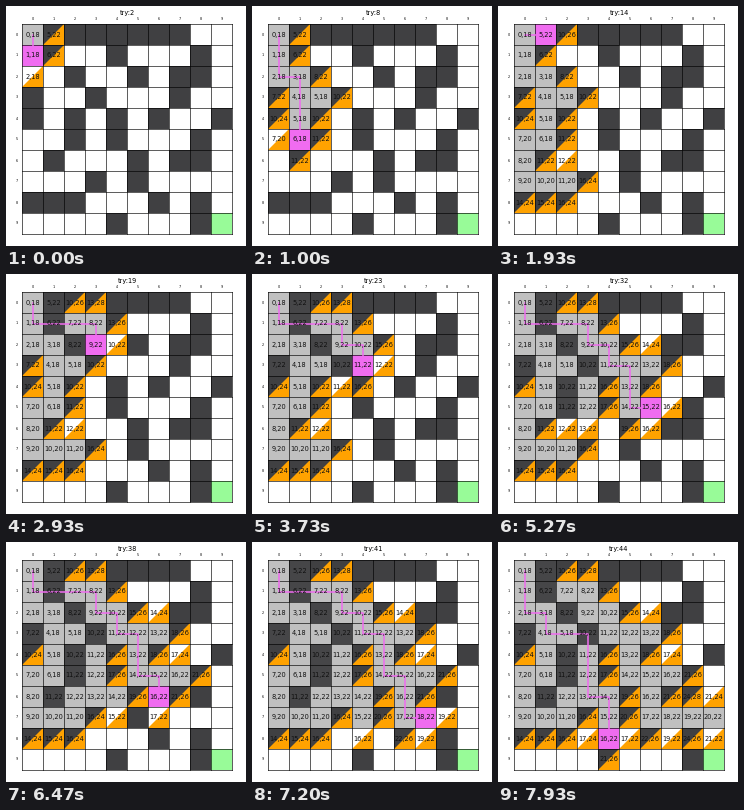
These frames come from a looping animation (240x240 px, 8000 ms). A matplotlib script:

```python
import matplotlib.pyplot as plt
from matplotlib.animation import FuncAnimation
from matplotlib.patches import Polygon, Rectangle

SIZE, DPI = 240, 100
FRAMES, LOOP_MS = 120, 8000
N, CELL, X0, Y0 = 10, 21, 16, 18
WALL_COST = 5

MAZE = [
    ".#######..",
    ".#..#...#.",
    "..#..#.##.",
    "#..#...#..",
    "#.#.#.#..#",
    "..#.#...#.",
    ".#...#.##.",
    "...#.#....",
    "###...#.#.",
    "....#...#.",
]

WHITE, WALL, CLOSED = "#ffffff", "#404042", "#c0c0c0"
CLOSED_WALL, ORANGE = "#464648", "#ffa200"
CURRENT, GOAL = "#f06cf0", "#98fb98"


def is_wall(cell):
    return MAZE[cell[0]][cell[1]] == "#"


def h(cell):
    return 2 * (N - 1) - cell[0] - cell[1]


def search(tries):
    """A* over the maze; returns one snapshot per expanded cell."""
    cost, parent = {(0, 0): 0}, {}
    opened, closed, steps = {(0, 0)}, set(), []
    for _ in range(tries):
        cur = min(opened, key=lambda c: (cost[c] + h(c), c))
        opened.remove(cur)
        closed.add(cur)
        r, c = cur
        for nxt in ((r - 1, c), (r, c - 1), (r, c + 1), (r + 1, c)):
            if not (0 <= nxt[0] < N and 0 <= nxt[1] < N) or nxt in closed:
                continue
            g = cost[cur] + (WALL_COST if is_wall(nxt) else 1)
            if g < cost.get(nxt, 999):
                cost[nxt], parent[nxt] = g, cur
                opened.add(nxt)
        path = [cur]
        while path[-1] in parent:
            path.append(parent[path[-1]])
        steps.append((cur, dict(cost), set(opened), set(closed), path))
    return steps


STEPS = search(44)


def try_at(frame):
    # the search slows down a little as the board fills
    return min(44, int(2.99 + 0.407 * frame - 0.00047 * frame ** 2))


def corner(cell):
    return X0 + CELL * cell[1], Y0 + CELL * cell[0]


def center(cell):
    x, y = corner(cell)
    return x + CELL / 2, y + CELL / 2


fig = plt.figure(figsize=(SIZE / DPI, SIZE / DPI), dpi=DPI, facecolor="white")
ax = fig.add_axes([0, 0, 1, 1])
ax.set_xlim(0, SIZE)
ax.set_ylim(SIZE, 0)
ax.axis("off")

CELLS = [(r, c) for r in range(N) for c in range(N)]
boxes, halves, labels = {}, {}, {}
for cell in CELLS:
    x, y = corner(cell)
    boxes[cell] = ax.add_patch(Rectangle((x, y), CELL, CELL, lw=0, zorder=1))
    halves[cell] = ax.add_patch(Polygon(
        [(x + CELL, y), (x + CELL, y + CELL), (x, y + CELL)],
        fc=ORANGE, lw=0, zorder=2))
    labels[cell] = ax.text(*center(cell), "", fontsize=4.8, color="#101010",
                           ha="center", va="center", zorder=5)

END = CELL * N
GRID = dict(color="black", alpha=0.75, lw=0.6, zorder=3)
for i in range(N + 1):
    x, y = X0 + CELL * i, Y0 + CELL * i
    ax.plot([x, x], [Y0, Y0 + END], **GRID)
    ax.plot([X0, X0 + END], [y, y], **GRID)
for i in range(N):
    mid = CELL * (i + 0.5)
    for x, y in ((X0 + mid, 13), (11, Y0 + mid)):
        ax.text(x, y, str(i), fontsize=2.4, color="black",
                ha="center", va="center")

route, = ax.plot([], [], color=CURRENT, lw=1.1, zorder=4)
title = ax.text(121, 7, "", fontsize=4.8, color="black",
                ha="center", va="center")


def fill(cell, cur, closed):
    if cell == cur:
        return CURRENT
    if cell == (N - 1, N - 1):
        return GOAL
    if cell in closed:
        return CLOSED_WALL if is_wall(cell) else CLOSED
    return WALL if is_wall(cell) else WHITE


def draw(frame):
    n = try_at(frame)
    cur, cost, opened, closed, path = STEPS[n - 1]
    for cell in CELLS:
        boxes[cell].set_facecolor(fill(cell, cur, closed))
        halves[cell].set_visible(cell in opened)
        g = cost.get(cell)
        labels[cell].set_text("" if g is None else f"{g},{g + h(cell)}")
    points = [center(cell) for cell in path]
    route.set_data([p[0] for p in points], [p[1] for p in points])
    title.set_text(f"try:{n}")
    return []


anim = FuncAnimation(fig, draw, frames=FRAMES, interval=LOOP_MS / FRAMES,
                     init_func=lambda: draw(0), repeat=True, repeat_delay=0,
                     blit=False)
plt.show()
```
